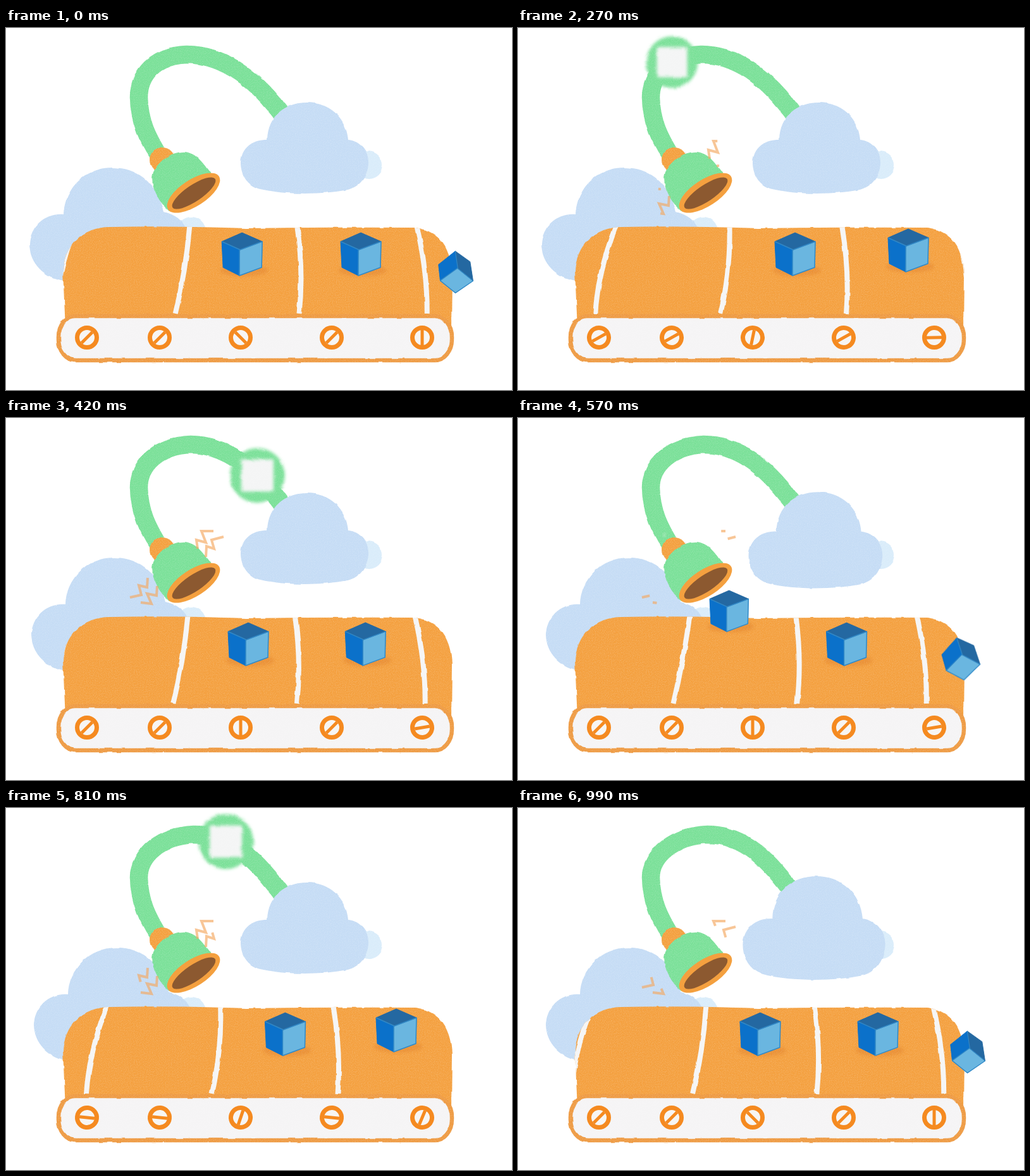
Write an HTML page that moves like this. It is 800x573 px and loops after 1.02 s.

```html
<!DOCTYPE html>
<html lang="en">
<head>
<meta charset="utf-8">
<title>Cloud conveyor</title>
<style>
  html, body { margin: 0; width: 100%; height: 100%; overflow: hidden; background: #fff; }
  svg { display: block; width: 100%; height: 100%; }
  .cloud { fill: #c5dcf5; }
  .pale { fill: #d9ecfa; }
  .green { fill: #7ae098; }
  .orange { fill: #f4a03f; }
  .line { fill: none; }
</style>
</head>
<body>
<svg viewBox="0 0 800 573">
  <defs>
    <filter id="paper" filterUnits="userSpaceOnUse" x="0" y="0" width="800" height="573" color-interpolation-filters="sRGB">
      <feTurbulence type="fractalNoise" baseFrequency=".07" seed="4"/>
      <feDisplacementMap in="SourceGraphic" scale="3.5" xChannelSelector="R" yChannelSelector="G" in2="" result="rough"/>
      <feTurbulence type="fractalNoise" baseFrequency=".8" seed="9"/>
      <feColorMatrix values="0 0 0 0 1  0 0 0 0 1  0 0 0 0 1  .6 0 0 0 -.27"/>
      <feComposite in2="rough" operator="atop"/>
    </filter>
    <filter id="soft" x="-50%" y="-50%" width="200%" height="200%"><feGaussianBlur stdDeviation="2.5"/></filter>
    <path id="belt" d="M94 475L90 385C92 345 120 315 165 315Q260 313 380 317Q520 315 648 316C688 322 704 352 705 390L704 475Z"/>
    <clipPath id="beltClip"><use href="#belt"/></clipPath>
    <ellipse id="mouth" rx="40.5" ry="13" transform="translate(297 261.5) rotate(-34)"/>
    <clipPath id="mouthClip"><use href="#mouth"/></clipPath>
  </defs>
  <g filter="url(#paper)">
    <circle class="pale" cx="293" cy="322" r="23"/>
    <path id="backCloud" class="cloud" d="M91 295C92 255 125 221 168 221C212 221 240 250 250 291C265 295 278 302 285 318V400H93C60 396 37 372 37 342C39 315 60 293 91 295Z"/>
    <use href="#belt" class="orange"/>
    <g clip-path="url(#beltClip)"><path id="stripes" class="line" stroke="#f5f5f5" stroke-width="8"/></g>
    <rect x="83" y="456" width="622" height="70" rx="27" ry="33" fill="#f5f4f5" stroke="#ee9a42" stroke-width="6.5"/>
    <path id="tube" class="line" stroke="#7ae098" stroke-width="28.5"/>
    <g id="pulses"></g>
    <circle class="orange" cx="247" cy="209" r="20"/>
    <path class="green" d="M258 290C236 270 227 245 233 228C243 208 262 196 282 196C303 198 312 215 328 236Z"/>
    <circle class="pale" cx="573" cy="217" r="22"/>
    <path id="frontCloud" class="cloud" d="M413 177C414 140 440 118 476 118C512 118 538 142 541 177C561 179 574 196 573 214C571 240 556 252 540 256C500 264 440 264 402 255C382 250 371 233 371 213C372 190 390 176 413 177Z"/>
  </g>
  <ellipse class="orange" rx="48" ry="21" transform="translate(296.5 261) rotate(-33)"/>
  <use href="#mouth" fill="#8c5930"/>
  <g id="screws" stroke="#f58a20"></g>
  <g id="sparks" class="line" stroke="#f4a860" stroke-width="4" opacity=".65"></g>
  <g id="cubes"></g>
</svg>
<script>
const LOOP = 1020, STEP = 30, SECOND = 450, GAP = 182;
const $ = id => document.getElementById(id);
const clamp = (v, lo = 0, hi = 1) => Math.max(lo, Math.min(hi, v));
const smooth = v => (v = clamp(v), v * v * (3 - 2 * v));
const bump = (v, middle, width) => Math.exp(-(((v - middle) / width) ** 2));

// Straight lines between [time, value] points, held at both ends.
function along(points, t) {
  const i = points.findIndex(p => p[0] > t);
  if (i === 0) return points[0][1];
  if (i < 0) return points[points.length - 1][1];
  const [[t0, a], [t1, b]] = points.slice(i - 1, i + 1);
  return a + (b - a) * (t - t0) / (t1 - t0);
}

// Horizontal way of the two cubes; each is sucked up at the end of it.
const routes = [
  { path: [[0, 711], [150, 656], [1122, 340]], suck: LOOP },
  { path: [[510, 711], [570, 700], [810, 617], [1020, 561], [1170, 482], [1440, 383], [1560, 340]], suck: LOOP + SECOND }
];

const sparkLines = [
  "M303 207L301 193L316 197L309 179H328",
  "M316 220L317 203L329 207L325 193L344 188",
  "M239 266L238 281L223 278L230 294L213 292",
  "M224 253L223 268L210 265L214 280L196 284"
];

function stripe(moved) {
  const x = 649 - .985 * moved - 12 * bump(moved, 205, 50);
  const foot = x + (x < 410 ? Math.max(-33, .19 * (x - 410)) : .07 * (x - 410));
  const bend = (x + foot) / 2 + clamp((x - 250) * .13, -14, 9);
  return `M${x} 312Q${bend} 385 ${foot} 452`;
}

function screw(x, angle) {
  return `<g transform="translate(${x} 490) rotate(${-angle})">
    <circle r="15.5" fill="#f7f5f3" stroke-width="7"/><path d="M-12 0H12" stroke-width="5"/></g>`;
}

function cube({ path, suck }, t) {
  const age = t - path[0][0] + 90, pull = clamp((t - suck - 90) / 80);
  if (age <= 0 || pull === 1) return "";
  const beltX = along(path, t);
  const tilt = Math.max(0, .93 * (beltX - 650));
  const x = beltX - 120 * pull ** 3;
  const y = 358 - 6 * bump(beltX, 617, 25) + .5 * tilt - 140 * pull;
  const size = Math.min(1, age / 60) * (1 - .8 * pull ** 3);
  const shadow = tilt < 25 && pull < .5
    ? '<ellipse cx="3" cy="26" rx="38" ry="9" fill="#d56f20" opacity=".28" filter="url(#soft)"/>' : "";
  const face = (points, fill) => `<polygon points="${points}" fill="${fill}" stroke="${fill}"/>`;
  return `<g${pull > .6 ? ' clip-path="url(#mouthClip)"' : ""}>
    <g transform="translate(${x} ${y}) scale(${size * (1 - .0035 * tilt)} ${size * (1 - .0021 * tilt)}) rotate(${tilt})" stroke-linejoin="round">` +
    shadow +
    face("-32,-20 -3,-7 -4,34 -30,21", "#0b71ca") +
    face("-3,-7 32,-20 31,21 -4,34", "#6ab6e0") +
    face("-32,-20 0,-34 32,-20 -3,-7", "#2468a1") +
    '<path d="M-32-20L-3-7L32-20L31 21L-4 34V-7" fill="none" stroke="#3188c6" stroke-width="1.5"/></g></g>';
}

// A swelling that runs up the tube into the cloud.
function pulse(c) {
  const p = (c - 90) / 420, side = 51 * clamp((c - 110) / 170), tube = $("tube");
  if (side === 0 || p > 1) return "";
  const { x, y } = tube.getPointAtLength(tube.getTotalLength() * (1 - (p + smooth(p)) / 2));
  return `<circle class="green" cx="${x}" cy="${y}" r="${.85 * side}" filter="url(#soft)"/>
    <rect x="${x - side / 2}" y="${y - side / 2}" width="${side}" height="${side}" fill="#f4f5f5" filter="url(#soft)"/>`;
}

// Each spark is drawn outwards, then erased from its start.
function spark(d, i, c) {
  const late = i % 2;
  const end = clamp((c - 140 - 120 * late) / 160), start = clamp((c - 480) / 100 - .1 * late);
  return end <= start ? "" :
    `<path d="${d}" pathLength="1" stroke-dasharray="${end - start} 2" stroke-dashoffset="${-start}"/>`;
}

function draw(t) {
  const cycles = [t, t - SECOND];

  const moved = .107 * t + 140 * smooth(t / 390) + 111 * smooth((t - 570) / 340);
  $("stripes").setAttribute("d", [-3, -2, -1, 0, 1, 2, 3].map(k => stripe(moved + k * GAP)).join(""));

  const spin1 = smooth(t / 330), spin2 = smooth((t - 570) / 370);
  const angle = 45 + 180 * (spin1 + spin2);
  $("screws").innerHTML = [128, 243, 515].map(x => screw(x, angle)).join("") +
    screw(371, 135 + 135 * spin1 + 225 * spin2) + screw(658, 90 + 100 * spin1 + 80 * spin2);

  const peak = 286 + 14 * t / LOOP;
  $("tube").setAttribute("d", `M440 142C400 85 ${peak + 60} 42 ${peak} 42C${peak - 52} 44 210 75 210 110C211 150 225 175 240 200`);
  $("pulses").innerHTML = cycles.map(pulse).join("");
  $("sparks").innerHTML = cycles.map(c => sparkLines.map((d, i) => spark(d, i, c)).join("")).join("");

  const swell = cycles.reduce((sum, c) => sum + bump(c, 540, 32), 0);
  $("backCloud").setAttribute("transform", `translate(${7 * smooth((t - 330) / 200)} 0)`);
  $("frontCloud").setAttribute("transform",
    `translate(${472 - 4 * swell} ${190 + 5 * bump(t, 520, 80)}) scale(${1 + .115 * swell} ${1 + .14 * swell}) translate(-472 -190)`);

  $("cubes").innerHTML = routes.map(r => [t - LOOP, t, t + LOOP].map(c => cube(r, c)).join("")).join("");
}

let shown = -1;
function tick(now) {
  const t = Math.floor(now % LOOP / STEP) * STEP;
  if (t !== shown) draw(shown = t);
  requestAnimationFrame(tick);
}
draw(0);
requestAnimationFrame(tick);
</script>
</body>
</html>
```
